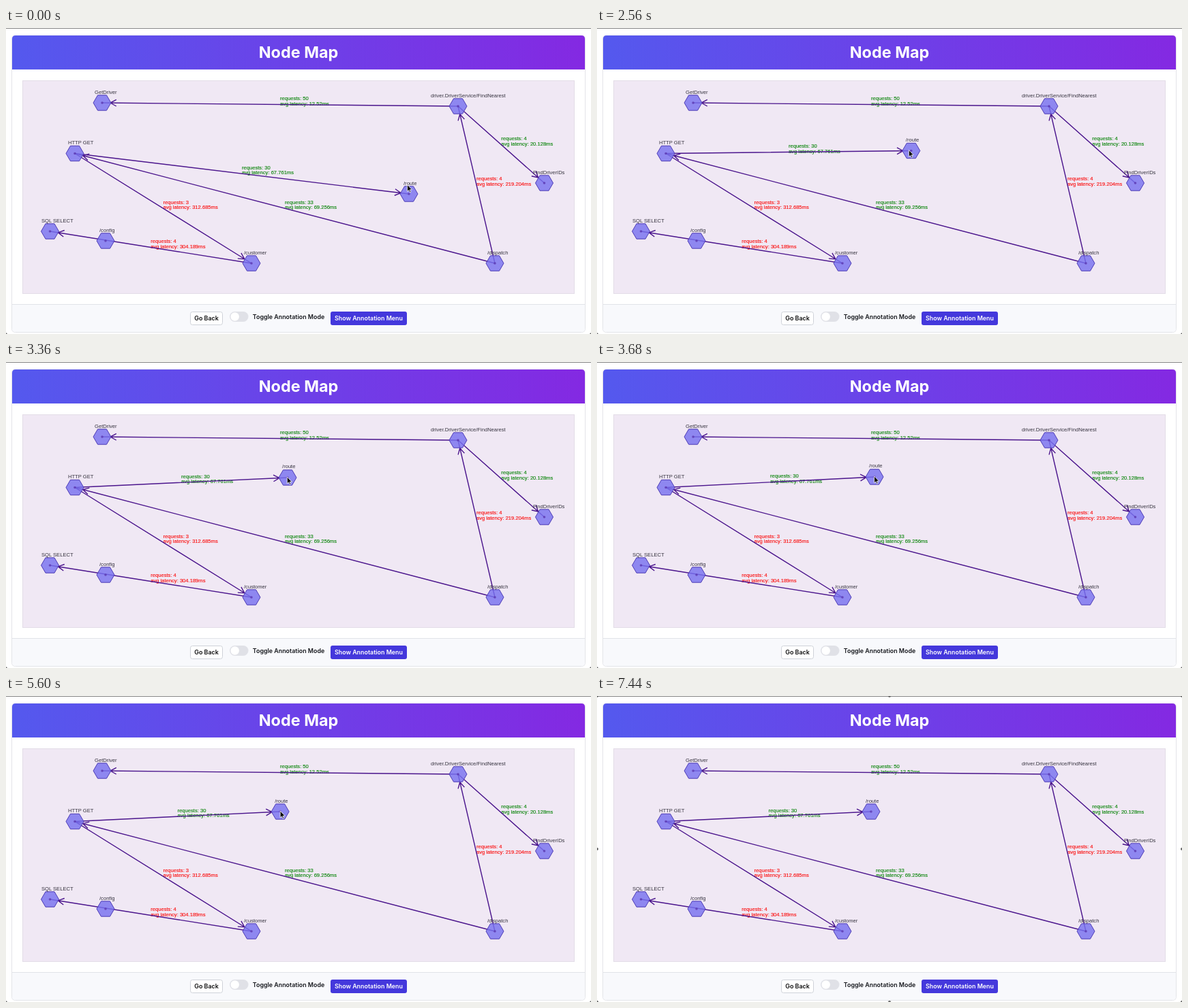
These frames come from a looping animation (858x450 px, 7.52 s). An HTML page:

```html
<!DOCTYPE html>
<html lang="en">
<head>
<meta charset="utf-8">
<title>Node Map</title>
<style>
  html, body { margin: 0; width: 100%; height: 100%; overflow: hidden; background: #fff; }
  svg { display: block; }
  .ui { font-family: Inter, sans-serif; font-weight: 600; font-size: 8.9px; text-anchor: middle; }
  .title { font-weight: 700; font-size: 23.4px; fill: #fff; }
  .graph { font-family: "Liberation Sans", Arial, sans-serif; font-size: 7.6px; }
  .name { fill: #36333f; }
  .stat { stroke-width: .15; }
  .edge { fill: none; stroke: #4a148c; stroke-width: 1.4; }
  .hex { fill: #7772ef; fill-opacity: .82; stroke: #4f3db5; stroke-width: 1; }
</style>
</head>
<body>
<svg width="858" height="450" viewBox="0 0 858 450">
  <defs>
    <linearGradient id="head" x1="9" y1="61" x2="849" y2="11" gradientUnits="userSpaceOnUse">
      <stop offset="0" stop-color="#5459ee"/>
      <stop offset="1" stop-color="#8429e2"/>
    </linearGradient>
  </defs>

  <rect width="858" height="450" fill="#fff"/>
  <rect width="858" height="1" fill="#858585"/>
  <path d="M0 447Q0 450 3 450H0ZM858 447Q858 450 855 450H858Z" fill="#333"/>

  <rect x="8.5" y="11" width="841" height="436.5" rx="5" fill="#fff" stroke="#e3e4e9"/>
  <path d="M9 406H849V442Q849 447 844 447H14Q9 447 9 442Z" fill="#f8f9fc"/>
  <path d="M9 406.5H849" stroke="#e1e3e8"/>
  <path d="M9 61V16Q9 11 14 11H844Q849 11 849 16V61Z" fill="url(#head)"/>
  <rect x="24.5" y="77.5" width="809" height="313" fill="#f0e8f4" stroke="#e3dde8"/>

  <g class="ui">
    <text class="title" x="429" y="44">Node Map</text>
    <rect x="270.5" y="417.5" width="47" height="19" rx="3" fill="#fff" stroke="#cfd2d9"/>
    <text x="294" y="430" fill="#111">Go Back</text>
    <rect x="328" y="417" width="27.5" height="15" rx="7.5" fill="#e0e1e7"/>
    <circle cx="335.7" cy="424.5" r="6.2" fill="#fff"/>
    <text x="414.5" y="427.5" fill="#15171c">Toggle Annotation Mode</text>
    <rect x="476" y="417" width="112" height="20" rx="3" fill="#4438dc"/>
    <text x="532" y="430" fill="#fff">Show Annotation Menu</text>
  </g>

  <g class="graph" id="graph"></g>

  <g id="handles" fill="#666">
    <circle cx="429" cy="0" r="2"/><circle cx="429" cy="450" r="2"/>
    <circle cx="0" cy="225" r="2"/><circle cx="858" cy="225" r="2"/>
    <circle cx="0" cy="0" r="2"/><circle cx="858" cy="0" r="2"/>
    <circle cx="0" cy="450" r="2"/><circle cx="858" cy="450" r="2"/>
  </g>
  <path id="cursor" d="M0 0V10L2.3 7.9L3.8 11.3L5.4 10.6L3.9 7.3H7Z"
        fill="#000" stroke="#fff" stroke-width=".8" stroke-linejoin="round"/>
</svg>

<script>
const LOOP = 7520, STEP = 80;
const $ = id => document.getElementById(id);
const graph = $("graph");

function add(tag, attrs, text) {
  const el = document.createElementNS("http://www.w3.org/2000/svg", tag);
  for (const key in attrs) el.setAttribute(key, attrs[key]);
  if (text) el.textContent = text;
  return graph.appendChild(el);
}

// name, centre x, centre y, label offset
const nodes = {
  driver: ["GetDriver", 141, 110, -11],
  nearest: ["driver.DriverService/FindNearest", 663, 115, -40],
  ids: ["FindDriverIDs", 789.5, 228, -16.5],
  http: ["HTTP GET", 101, 184.5, -10],
  route: ["/route", 591, 244, -8],
  sql: ["SQL SELECT", 64.5, 299, -12.5],
  config: ["/config", 146, 313, -9],
  customer: ["/customer", 360, 346, -11],
  dispatch: ["/dispatch", 717, 346, -11]
};

// from, to, requests, latency, slow
const edges = [
  ["nearest", "driver", 50, "12.52"],
  ["nearest", "ids", 4, "20.128"],
  ["dispatch", "nearest", 4, "219.204", true],
  ["dispatch", "http", 33, "69.256"],
  ["http", "route", 30, "67.761"],
  ["http", "customer", 3, "312.685", true],
  ["customer", "sql", 4, "304.189", true]
];

const stats = edges.map(([, , count, ms, slow]) => {
  const color = slow ? "#fb1010" : "#0b850b";
  const style = { class: "stat", fill: color, stroke: color };
  return [add("text", style, `requests: ${count}`), add("text", style, `avg latency: ${ms}ms`)];
});
const lines = edges.map(() => add("path", { class: "edge" }));

const shapes = {};
for (const id in nodes) {
  const [name, , , dx] = nodes[id];
  shapes[id] = [
    add("path", { class: "hex", d: "M-13 0L-6.5 -11.2H6.5L13 0L6.5 11.2H-6.5Z" }),
    add("circle", { r: 1.8, fill: "#5a35ad", "fill-opacity": .75 }),
    add("text", { class: "name", x: dx, y: -13.5 }, name)
  ];
}

function moveTo(el, x, y) {
  el.setAttribute("transform", `translate(${x.toFixed(2)} ${y.toFixed(2)})`);
}

function placeNode(id) {
  const [, x, y] = nodes[id];
  shapes[id].forEach(el => moveTo(el, x, y));
}

function placeEdge(i) {
  const [, x1, y1] = nodes[edges[i][0]], [, x2, y2] = nodes[edges[i][1]];
  const a = Math.atan2(y2 - y1, x2 - x1);
  const tx = x2 - 12 * Math.cos(a), ty = y2 - 12 * Math.sin(a);
  const arm = turn => `${tx - 10 * Math.cos(a + turn)} ${ty - 10 * Math.sin(a + turn)}`;
  lines[i].setAttribute("d", `M${x1} ${y1}L${x2} ${y2}M${arm(.5)}L${tx} ${ty}L${arm(-.5)}`);
  const mx = (x1 + x2) / 2, my = (y1 + y2) / 2;
  moveTo(stats[i][0], mx, my - 6.5);
  moveTo(stats[i][1], mx, my + 1);
}

const lerp = (a, b, p) => a + (b - a) * p;
const clamp = p => Math.max(0, Math.min(1, p));
const smooth = p => p * p * (3 - 2 * p);

// The dragged node, followed by the pointer offset
function drag(t) {
  if (t < 2400) {
    const p = (t < 80 ? 0 : t < 160 ? 1 : t < 1200 ? 2 : 3) / 3;
    return [lerp(591, 496.5, p), lerp(244, 189.8, p), lerp(-2.5, -5.5, p), lerp(-13.5, -1.2, p)];
  }
  const n = (t - 2320) / STEP, settle = 2 * clamp((t - 4560) / 960);
  const slide = Math.exp(-.154 * n);
  return [400 + 96.5 * slide + settle, 168 + 21.8 * Math.exp(-.185 * n) + settle, -5.5 * slide, -1];
}

function draw(time) {
  const t = Math.floor(time % LOOP / STEP) * STEP;
  const [x, y, dx, dy] = drag(t);
  nodes.route[1] = x;
  nodes.route[2] = y;
  placeNode("route");
  placeEdge(4);

  const leave = smooth(clamp((t - 5840) / 880));
  moveTo($("cursor"), lerp(x + dx, 470, leave), lerp(y + dy, -16, leave));
  $("handles").style.display = t >= 6480 ? "" : "none";
}

Object.keys(nodes).forEach(placeNode);
edges.forEach((_, i) => placeEdge(i));

const start = performance.now();
function tick() {
  draw(performance.now() - start);
  requestAnimationFrame(tick);
}
tick();
</script>
</body>
</html>
```
